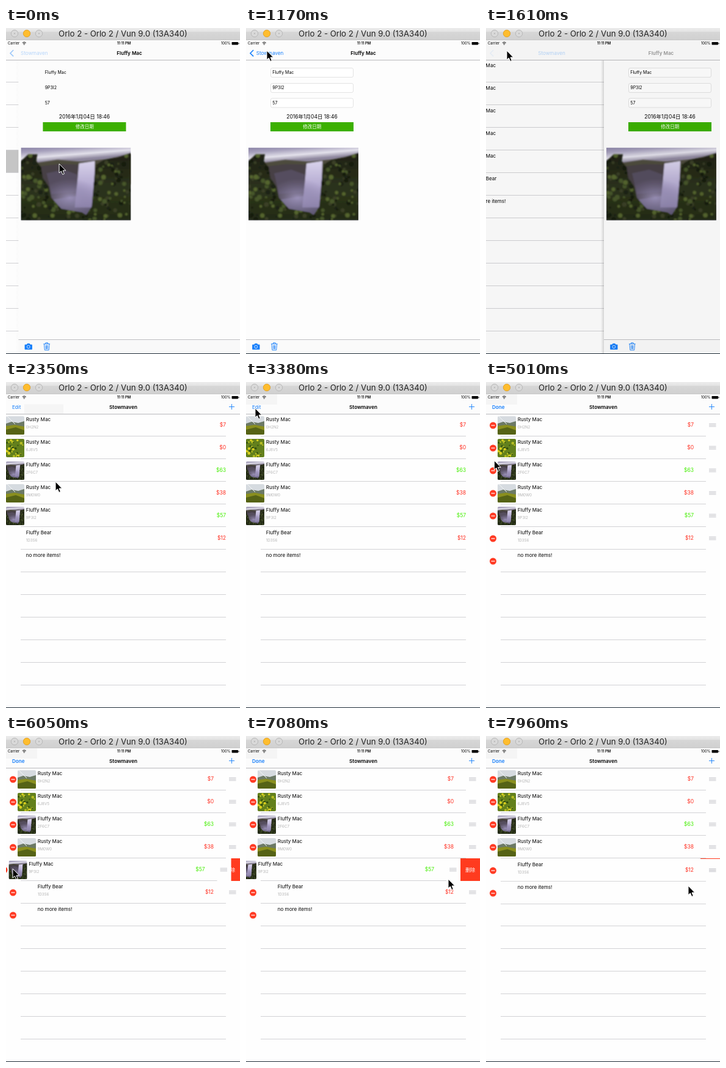
An HTML page that plays this animation: 383 by 533 pixels, repeating every 8 s.

```html
<!DOCTYPE html>
<html lang="zh-CN">
<head>
<meta charset="utf-8">
<title>Item list</title>
<style>
html, body { margin: 0; width: 100%; height: 100%; overflow: hidden; background: #fff; }
svg { display: block; width: 383px; height: 533px; }
svg svg { width: auto; height: auto; }
text { font: 8.1px Inter, "Noto Sans CJK SC", "Noto Sans CJK", sans-serif; fill: #000; white-space: pre; }
.b { font-weight: 600; }
.m { text-anchor: middle; }
.e { text-anchor: end; }
.blue { fill: #157efb; }
.f { font-size: 7px; }
.d { font-size: 8.5px; }
.s { font-size: 5.9px; }
.sub { font-size: 6.2px; fill: #b4b4b4; }
.title { font-size: 13.2px; fill: #222; }
.line { stroke: #d2d2d5; stroke-width: 1; }
.icon { fill: none; stroke: #157efb; stroke-width: .9; }
</style>
</head>
<body>
<svg id="stage" viewBox="0 0 383 533" xmlns="http://www.w3.org/2000/svg">
<defs>
  <linearGradient id="bar" x2="0" y2="1">
    <stop offset="0" stop-color="#ececec"/><stop offset=".28" stop-color="#e4e4e4"/>
    <stop offset=".34" stop-color="#d6d6d6"/><stop offset="1" stop-color="#d0d0d0"/>
  </linearGradient>
  <linearGradient id="sky" x2=".12" y2="1">
    <stop offset="0" stop-color="#8a83a6"/><stop offset=".07" stop-color="#a8a2bd"/>
    <stop offset=".15" stop-color="#e2e0ea"/><stop offset=".22" stop-color="#8f889f"/>
    <stop offset="1" stop-color="#5c5570"/>
  </linearGradient>
  <linearGradient id="fall" x2="0" y2="1">
    <stop offset="0" stop-color="#d9d3ec"/><stop offset=".55" stop-color="#b3a9d0"/>
    <stop offset="1" stop-color="#8e84ac"/>
  </linearGradient>
  <linearGradient id="slope" x2="0" y2="1">
    <stop offset="0" stop-color="#1f2117"/><stop offset=".55" stop-color="#2c331b"/>
    <stop offset="1" stop-color="#232b15"/>
  </linearGradient>
  <radialGradient id="mist">
    <stop offset="0" stop-color="#9f95bd" stop-opacity=".9"/>
    <stop offset="1" stop-color="#7d7499" stop-opacity="0"/>
  </radialGradient>
  <linearGradient id="edge">
    <stop offset="0" stop-opacity="0"/><stop offset="1" stop-opacity=".18"/>
  </linearGradient>
  <filter id="soft" x="-5%" y="-5%" width="110%" height="110%"><feGaussianBlur stdDeviation="1.1"/></filter>
  <clipPath id="round"><rect width="30" height="30" rx="2"/></clipPath>
  <clipPath id="frame"><rect width="180" height="119"/></clipPath>
  <clipPath id="shrink"><rect id="shrinkBox" width="383" height="37"/></clipPath>
  <path id="right" d="M122 28L136 20 158 16 180 9V119H102L116 96Z"/>
  <path id="left" d="M0 22L12 11 27 11 25 22 33 32 36 50 46 64 50 82 66 100 100 106 118 119H0Z"/>
  <clipPath id="hills"><use href="#right"/><use href="#left"/></clipPath>
  <g id="falls" clip-path="url(#frame)">
    <rect width="180" height="119" fill="url(#sky)"/>
    <g filter="url(#soft)">
      <path d="M26 25L60 20 98 23 140 19 184 10V60H26Z" fill="#4d4b3c"/>
      <path d="M28 31L62 27 96 28 98 78 46 86 28 70Z" fill="#463f45"/>
      <path d="M42 42L70 36 92 44 92 72 50 76Z" fill="#554d5e"/>
      <path d="M95 26L121 22 120 60 117 98H88L92 60Z" fill="url(#fall)"/>
      <ellipse cx="80" cy="82" rx="50" ry="32" fill="url(#mist)"/>
      <use href="#right" fill="url(#slope)"/>
      <use href="#left" fill="url(#slope)"/>
      <g id="scrub" clip-path="url(#hills)"></g>
    </g>
  </g>
  <svg id="pic0" width="30" height="30" viewBox="30 0 119 119"><use href="#falls"/></svg>
  <g id="pic1">
    <rect width="30" height="30" fill="#d6dbe0"/>
    <path d="M0 12L9 9 20 11 30 8V20H0Z" fill="#6c7a66"/>
    <path d="M0 16L14 14 30 17V30H0Z" fill="#8a8f1e"/>
    <path d="M0 22L16 18 30 23V30H0Z" fill="#566316"/>
    <path d="M2 0L15 13" stroke="#f2f4f5"/>
  </g>
  <g id="pic2"><rect width="30" height="30" fill="#63801d"/><g id="flowers"></g></g>
  <g id="grip" stroke="#c4c4c9" stroke-width="1.1"><path d="M365 16.3h11.5M365 18.5h11.5M365 20.7h11.5"/></g>
</defs>

<rect width="383" height="533" fill="#fefefe"/>

<g id="list">
  <rect y="52" width="383" height="481" fill="#fefefe"/>
  <g id="rows"></g>
</g>

<g id="detail">
  <rect id="shade" x="-5" y="53" width="5" height="480" fill="url(#edge)"/>
  <rect y="52" width="383" height="481" fill="#fdfdfd"/>
  <g id="boxes" fill="#fff" stroke="#dcdcdc" stroke-width=".8">
    <rect x="40.5" y="65.5" width="135" height="15" rx="2.5"/>
    <rect x="40.5" y="90.5" width="135" height="15" rx="2.5"/>
    <rect x="40.5" y="115" width="135" height="15" rx="2.5"/>
  </g>
  <text class="f" x="43.3" y="75.2">Fluffy Mac</text>
  <text class="f" x="43.3" y="100.2">9P3I2</text>
  <text class="f" x="43.3" y="124.7">57</text>
  <text class="m d" x="108" y="147.5">2016年1月04日 18:46</text>
  <rect x="40" y="154" width="136" height="15" fill="#3cb000"/>
  <text class="m" x="108.3" y="164.1" style="font-size:7.5px;fill:#fff">修改日期</text>
  <g transform="translate(4 195.5)"><use href="#falls"/></g>
  <rect y="509" width="383" height="24" fill="#fafafa"/>
  <path class="line" d="M0 509.5H383" style="stroke:#bfbfc2"/>
  <path d="M11 517.5h2.4l1.2-1.7h3.6l1.2 1.7h2.4q.7 0 .7.7v6.8q0 .7-.7.7H10.9q-.7 0-.7-.7v-6.8q0-.7.8-.7Z" fill="#157efb"/>
  <circle cx="16.3" cy="521.3" r="2.4" fill="#157efb" stroke="#fff" stroke-width=".8"/>
  <path class="icon" d="M41 516.5h10.6M44.5 516.3v-1.7h3.6v1.7M42 517l.9 9.6h6.8l.9-9.6M44.7 518.5l.2 6.5M46.3 518.5v6.5M47.9 518.5l-.2 6.5"/>
</g>

<rect y="20" width="383" height="32" fill="#fcfcfc"/>
<rect id="patchA" x="30" y="36.5" width="64" height="15" fill="#f5f5f5"/>
<rect id="patchB" y="20" width="51" height="17" fill="#f5f5f5"/>
<path d="M0 52.5H383" stroke="#b9b9bc"/>
<path id="chevron" d="M12.2 36L7 41.2 12.2 46.4" class="icon" style="stroke-width:1.6"/>
<text id="back" class="blue m" y="44.2">Stowmaven</text>
<text id="itemTitle" class="b m" y="44.2">Fluffy Mac</text>
<text id="listTitle" class="b m" y="44.2">Stowmaven</text>
<text id="edit" class="blue" x="10" y="44.2">Edit</text>
<text id="done" class="blue b" x="10" y="44.2">Done</text>
<path id="plus" class="icon" d="M365 40.5h9M369.5 36v9"/>

<rect id="dim" y="20" width="383" height="513"/>
<text class="s" x="3" y="27.4">Carrier</text>
<g fill="none" stroke="#000" stroke-width=".9">
  <path d="M26.8 24.2q3-2.6 6 0M28.1 25.7q1.7-1.4 3.4 0"/>
  <circle cx="29.8" cy="27" r=".3"/>
</g>
<text class="s b m" x="193" y="27.4">11:11 PM</text>
<text class="s e" x="367.5" y="27.4">100%</text>
<rect x="369.5" y="23" width="10.5" height="4.6" rx=".8"/>
<rect x="380.5" y="24.3" width="1" height="2"/>

<rect width="383" height="20" fill="url(#bar)"/>
<path d="M0 19.5H383" stroke="#c2c2c2" stroke-width=".6"/>
<g fill="#d9d9d9" stroke="#b5b5b5" stroke-width=".9">
  <circle cx="14" cy="9" r="5.7"/><circle cx="54" cy="9" r="5.7"/>
  <circle cx="34" cy="9" r="5.7" fill="#ffbd2e" stroke="#dfa023"/>
</g>
<g fill="#bdbdbd"><circle cx="14" cy="9" r="1.2"/><circle cx="54" cy="9" r="1.2"/></g>
<text class="title m" x="191.5" y="14">Orlo 2 - Orlo 2 / Vun 9.0 (13A340)</text>
<rect y="532" width="383" height="1" fill="#1d2b36"/>
<path id="cursor" d="M0 0V15L3.4 11.9 5.8 17.5 8.3 16.4 6 11H10.7Z" stroke="#fff" stroke-width="1" stroke-linejoin="round"/>
</svg>

<script>
const $ = id => document.getElementById(id);
const LOOP = 8000, STEP = 147.4, W = 383, TOP = 52, ROW = 37, GONE = 4;
const RED = '#ff2d1f', GREEN = '#43ee00';

// name, serial, price, picture
const items = [
  ['Rusty Mac', '0H2N2', 7, 1],
  ['Rusty Mac', '6J8V5', 0, 2],
  ['Fluffy Mac', '2F6C7', 63, 0],
  ['Rusty Mac', '9M0W0', 38, 1],
  ['Fluffy Mac', '9P3I2', 57, 0],
  ['Fluffy Bear', '1D3S6', 12],
  ['no more items!']
];

// step, value(s)
const detailKeys = [[0, 20.4], [1, 6], [2, 0], [10, 0], [11, 193], [12, 325], [13, 368], [14, 380], [15, W]];
const editKeys = [[29, 0], [30, .25], [31, .75], [32, 1]];
const slideKeys = [[40, 0], [41, 14.5], [42, 27], [43, 32]];
const goneKeys = [[52, 0], [53, .6], [54, .97]];
const cursorKeys = [
  [3, 87, 222], [8, 34, 37], [12, 34, 37], [16, 81, 163], [18, 37, 213],
  [22, 15, 25], [23, 15, 43], [26, 15, 43], [28, 16, 42], [31, 16, 42],
  [37, 11, 215], [38, 11, 217], [42, 11, 217], [45, 180, 262], [48, 331, 234],
  [49, 346, 222], [50, 362, 213], [52, 362, 213], [54, 331, 245]
];

function at(keys, n, col = 1) {
  const i = keys.findIndex(k => k[0] >= n);
  if (i < 0) return keys[keys.length - 1][col];
  if (i === 0) return keys[0][col];
  const a = keys[i - 1], b = keys[i];
  return a[col] + (b[col] - a[col]) * (n - a[0]) / (b[0] - a[0]);
}

const clamp = v => Math.max(0, Math.min(1, v));
const move = (el, x, y = 0) => el.setAttribute('transform', `translate(${x.toFixed(2)} ${y.toFixed(2)})`);
const fade = (el, v) => el.setAttribute('opacity', clamp(v));

// Seeded blotches over a w by h area, colours from top to bottom rows alternating.
function spots(count, w, h, size, colors) {
  let seed = 5, out = '';
  const rnd = () => (seed = seed * 16807 % 2147483647) / 2147483647;
  for (let i = 0; i < count; i++) {
    const x = rnd() * w, y = rnd() * h, r = size * (1 + rnd() * 1.5);
    out += `<circle cx="${x.toFixed(1)}" cy="${y.toFixed(1)}" r="${r.toFixed(1)}" fill="${colors[i % colors.length]}"/>`;
  }
  return out;
}

function rowMarkup([name, serial, price, pic], i) {
  const full = serial !== undefined;
  const color = price > 50 ? GREEN : RED;
  const photo = pic === undefined ? '' : `<g transform="translate(0 4)" clip-path="url(#round)"><use href="#pic${pic}"/></g>`;
  const remove = i !== GONE ? '' :
    `<rect x="351" width="32" height="37" fill="#ff3b1f"/>
     <text class="m" x="367" y="21.5" style="fill:#fff">删除</text>`;
  return `<g class="row"><g ${i === GONE ? 'clip-path="url(#shrink)"' : ''}>${remove}
    <rect class="cell" width="383" height="37" fill="#fefefe"/>
    <g class="minus"><circle cx="11.5" cy="19" r="5.5" fill="#ff3b24"/><path d="M8.5 19h6" stroke="#fff" stroke-width="1.2"/></g>
    <g class="info">${photo}<text x="32.7" y="12">${name}</text><text class="sub" x="32.7" y="24.3">${serial || ''}</text></g>
    <text class="price e d" x="360" y="21" style="fill:${color}">${full ? '$' + price : ''}</text>
    <g class="grip">${full ? '<use href="#grip"/>' : ''}</g>
    <path class="line rule" d="M24 36.5H360"/></g></g>`;
}

$('scrub').innerHTML = spots(260, 180, 119, 1.6, ['#46562a', '#171a10', '#3a3f26', '#1d2412', '#55652f']);
$('flowers').innerHTML = spots(34, 30, 30, 1, ['#d9cf1f', '#b6bd25', '#34510f']);

let html = '';
for (let i = 6; i < 12; i++) html += `<path class="line" d="M24 ${TOP + ROW * i + 36.5}H360"/>`;
$('rows').innerHTML = html + items.map(rowMarkup).join('');
const rows = [...document.querySelectorAll('.row')].map(g => {
  const part = { g };
  for (const c of ['cell', 'minus', 'info', 'price', 'grip', 'rule']) part[c] = g.querySelector('.' + c);
  return part;
});

function drawRows(n) {
  const e = at(editKeys, n), slide = at(slideKeys, n), gone = at(goneKeys, n);
  rows.forEach((r, i) => {
    const s = i === GONE ? slide : 0;
    move(r.g, 0, TOP + ROW * (i - (i > GONE ? gone : 0)));
    move(r.cell, -s);
    move(r.minus, (e - 1) * 3.3 - s);
    fade(r.minus, e < .5 ? e * .7 : e);
    move(r.info, 19 * e - s);
    move(r.price, -20 * e - s);
    move(r.grip, (1 - e) * 20 - s);
    fade(r.grip, e * 4);
    r.rule.setAttribute('d', `M24 36.5H${360 - s}`);
  });
  rows[GONE].cell.setAttribute('fill', n < 3 ? '#c6c6c6' : '#fefefe');
  $('shrinkBox').setAttribute('height', ROW * (1 - gone));
  fade($('edit'), n >= 30 ? 0 : at(detailKeys, n) / W * 2 - 1);
  fade($('done'), e * 1.33 - .33);
}

function drawNav(n, d) {
  const p = d / W, still = d === 0, listShown = p === 1 ? 1 : p * 2 - 1.01;
  move($('back'), 39 + d * .355);
  fade($('back'), still ? 1 : p < .6 ? .3 : .3 - (p - .6) * 2);
  fade($('chevron'), still ? 1 : .45 - p * .75);
  move($('itemTitle'), 192 + d * .49);
  fade($('itemTitle'), 1.1 - p * 1.4);
  move($('listTitle'), 192 - (W - d) * .4);
  fade($('listTitle'), listShown);
  fade($('plus'), listShown);
  fade($('patchA'), n >= 15 && n < 18 ? 1 : 0);
  fade($('patchB'), n >= 18 ? 1 : 0);
}

function draw(t) {
  const n = Math.min(54, Math.floor((t + 12) / STEP));
  const d = at(detailKeys, n);
  move($('list'), -.3 * (W - d));
  move($('detail'), d);
  $('detail').style.display = d < W ? '' : 'none';
  fade($('shade'), d / W * 1.6);
  fade($('boxes'), n ? 1 : 0);
  fade($('dim'), .03 * Math.sin(Math.PI * d / W));
  drawNav(n, d);
  drawRows(n);
  move($('cursor'), at(cursorKeys, n), at(cursorKeys, n, 2));
}

const start = performance.now();
function tick(now) {
  draw(Math.max(0, now - start) % LOOP);
  requestAnimationFrame(tick);
}
draw(0);
requestAnimationFrame(tick);
</script>
</body>
</html>
```
